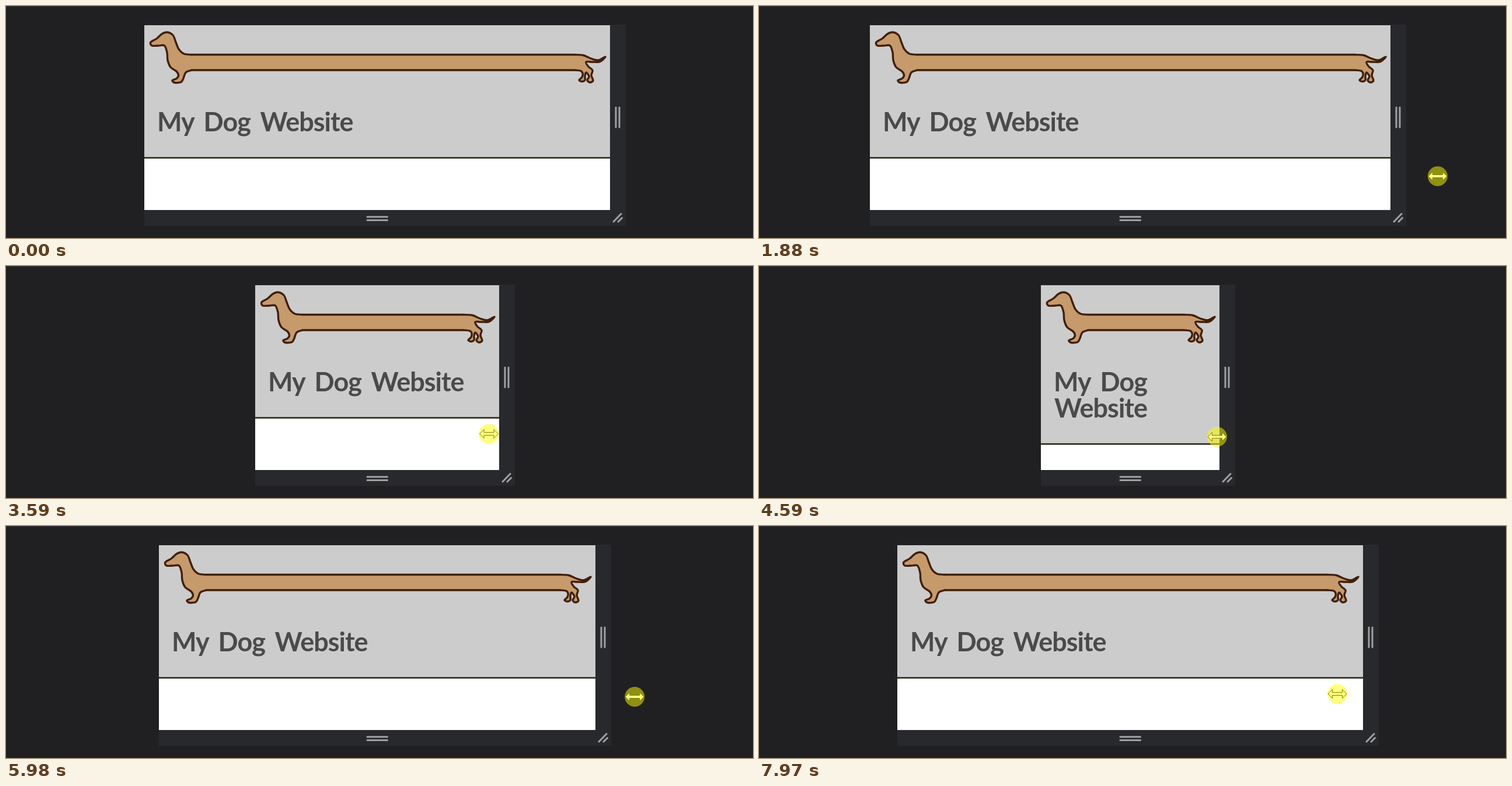
Write an HTML page that moves like this. It is 1280 px wide and 398 px high and loops after 8000 ms.

```html
<!DOCTYPE html>
<html lang="en">
<head>
<meta charset="utf-8">
<title>My Dog Website</title>
<style>
  html, body { margin: 0; width: 100%; height: 100%; overflow: hidden; background: #202022; }
  svg { display: block; width: 1280px; height: 398px; }
  .grip { stroke: #a0a1a3; stroke-width: 3; stroke-linecap: round; fill: none; }
  .dog { fill: #c69a6a; stroke: #3f1f0b; stroke-width: 3.4; stroke-linejoin: round; }
  .title { font: 700 45px Lato, sans-serif; fill: #4a4a4b; letter-spacing: -1px; word-spacing: 7px; }
  .cursor { fill: #fff; stroke: #000; stroke-width: 1; }
</style>
</head>
<body>
<svg viewBox="0 0 1280 398">
  <rect width="1280" height="1" fill="#353537"/>
  <rect id="tray" y="32" height="345" fill="#28292c"/>
  <rect id="page" y="33" height="317" fill="#fff"/>
  <rect id="header" y="33" fill="#ccc"/>
  <rect id="rule" height="2.8" fill="#38342a"/>

  <rect id="torso" y="83.5" height="26.5" fill="#c69a6a"/>
  <g id="left">
    <path class="dog" id="head"/>
    <text class="title" id="wide" x="22" y="214.5">My Dog Website</text>
    <g class="title" id="narrow">
      <text x="22" y="214.5">My Dog</text>
      <text x="23" y="259.5">Website</text>
    </g>
  </g>
  <g id="right">
    <path class="dog" id="tail"/>
    <path class="grip" d="M10 174V208M16 174V208M6 370L19 356.5M14 370L20.5 363.5"/>
  </g>
  <path id="back" class="dog" style="fill:none"/>
  <path class="grip" d="M619 361.7H653.5M619 367.5H653.5"/>

  <path id="arrow" class="cursor" d="M0 0V25L5.5 19.5L9.5 28L13 26.5L9 18H17Z"/>
  <g id="resize">
    <path class="cursor" d="M-16 0L-8.5 -7.5V-2.5H8.5V-7.5L16 0L8.5 7.5V2.5H-8.5V7.5Z"/>
    <circle id="glow" r="17" fill="#ff0" fill-opacity=".5"/>
  </g>
</svg>
<script>
const LOOP = 8000, LAST = 7970, LAG = 120;
const el = {};
document.querySelectorAll('[id]').forEach(e => el[e.id] = e);

const set = (e, attrs) => { for (const k in attrs) e.setAttribute(k, attrs[k]); };
const move = (e, x, y) => set(e, { transform: `translate(${x} ${y})` });
const show = (e, on) => e.style.display = on ? '' : 'none';

// Smooth path through a few outline points.
function outline(text) {
  const p = text.split(' ').map(s => s.split(',').map(Number));
  const at = i => p[Math.max(0, Math.min(i, p.length - 1))];
  const handle = (i, side) => at(i).map((v, k) => v + side * (at(i + 1)[k] - at(i - 1)[k]) / 6);
  return 'M' + p[0] + p.slice(1).map((q, i) => `C${handle(i, 1)} ${handle(i + 1, -1)} ${q}`).join('');
}

// S-curve from 0 to 1 that passes one half at mid.
function ease(u, mid = .5, power = 2) {
  if (u <= 0) return 0;
  if (u >= 1) return 1;
  return 1 / (1 + ((1 - u) / u * mid / (1 - mid)) ** power);
}

// Sum of eased swings: from, to, distance, mid, power.
const path = (base, swings) => t => swings.reduce(
  (v, [from, to, by, mid, power]) => v + by * ease((t - from) / (to - from), mid, power), base);

const dragX = path(1042, [
  [1640, 2430, 228, .29, 1.67],
  [2430, 4200, -467, .385, 2.6],
  [4200, 4750, -23, .58, 2.27],
  [4750, 7010, 494, .5, 2.3],
  [7290, 8400, -344, .406, 1.83]
]);
const dragY = path(352, [
  [1300, 1500, -42], [1680, 1880, -18], [2000, 2780, -7], [2900, 4500, 8], [6000, 7970, -5]
]);

set(el.head, { d: outline('81,83.5 68,82 59,74 54,62 49,50 39,45 30,48 21,56 11,62 13,68 24,68 34.5,68 '
  + '39,80 40,93 45,105 55,112 58.5,119 55,124.5 48,127.5 52,131.5 63,130.5 67,124 71,114 81,110') });
set(el.tail, { d: outline('-61,83.5 -46,84.5 -33,90 -20,93 -8,87 -17,95.5 -30,96 -41,96 -37,104 -30,110 '
  + '-32,119 -29,128 -35,131 -39,127 -36,121 -41,114 -43,120 -43,127 -48,129.5 -53,127 -48,122 -47,115 -51,111 -61,110') });

function draw(t) {
  // The frame is centred and trails the pointer a little.
  const r = Math.round(dragX(t - LAG) - 7), l = 1272 - r, w = r - l;
  const wraps = w < 386, bottom = wraps ? 304 : 259;

  set(el.tray, { x: l, width: w + 27 });
  set(el.page, { x: l, width: w });
  set(el.header, { x: l, width: w, height: bottom - 33 });
  set(el.rule, { x: l, y: bottom, width: w });
  set(el.torso, { x: l + 80, width: w - 140 });
  set(el.back, { d: `M${l + 80} 83.5H${r - 60}M${l + 80} 110H${r - 60}` });
  move(el.left, l, 0);
  move(el.right, r, 0);
  show(el.wide, !wraps);
  show(el.narrow, wraps);

  show(el.arrow, t >= 500 && t < 1300);
  show(el.resize, t >= 1300);
  show(el.glow, t >= 1440);
  const u = ease((t - 500) / 760, .5, 1.5);
  move(el.arrow, 865 + 161 * u, 259 + 450 * (u - .56) ** 2);
  move(el.resize, dragX(t), dragY(t));
}

const start = performance.now();
function tick() {
  draw(Math.min((performance.now() - start) % LOOP, LAST));
  requestAnimationFrame(tick);
}
tick();
</script>
</body>
</html>
```
